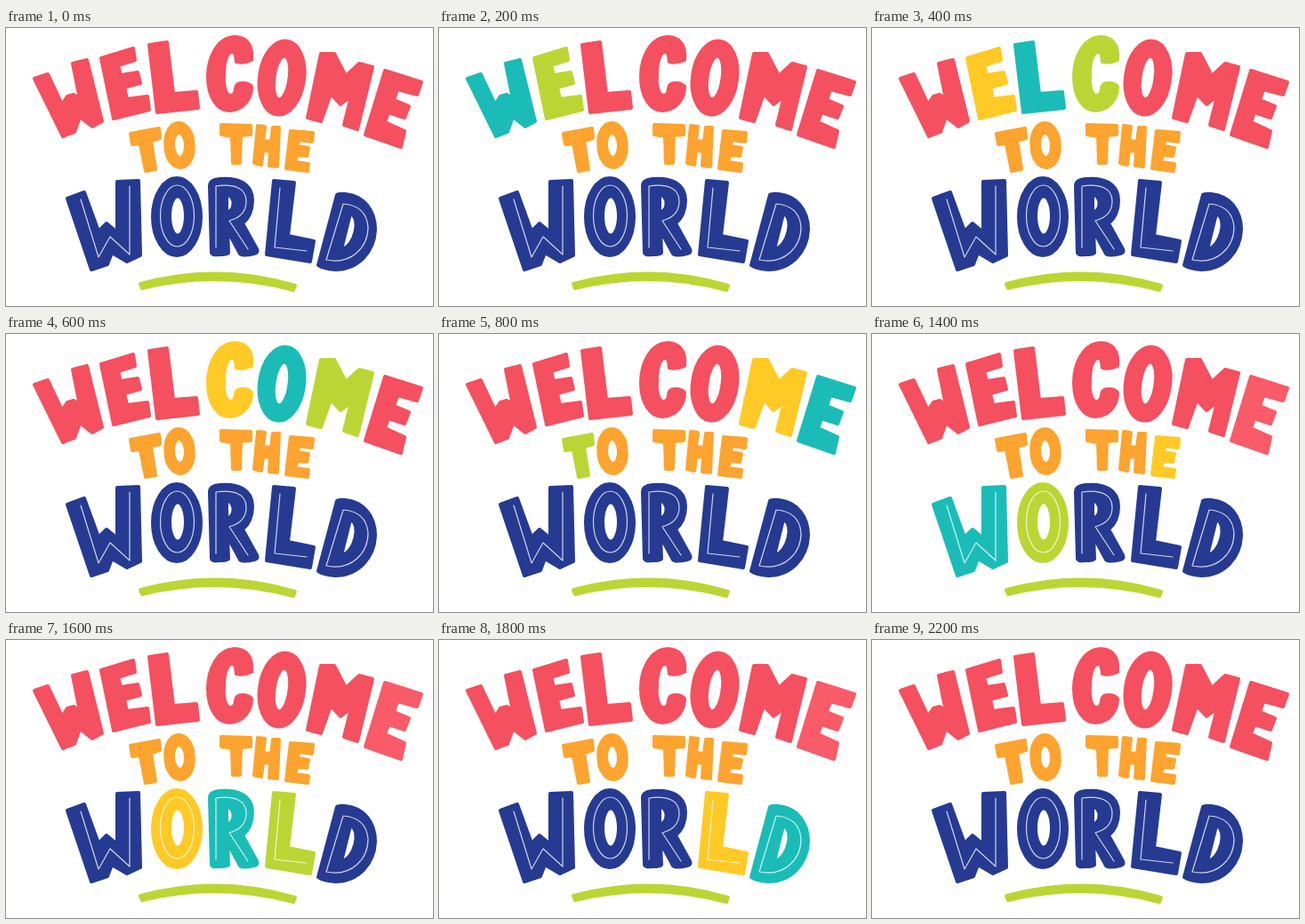
Animation, 480 px wide and 313 px high, one loop 2.4 s. Source, as an HTML page:

```html
<!DOCTYPE html>
<html lang="en">
<head>
<meta charset="utf-8">
<title>Welcome to the world</title>
<style>
  html, body { margin: 0; width: 100%; height: 100%; overflow: hidden; background: #fff; }
  svg { display: block; width: 100%; height: 100%; }
  .red { --base: #f45060; }
  .orange { --base: #fca42f; }
  .navy { --base: #263a92; }
  .tint { --after: #f95b68; }
  .letter, .swoosh {
    fill: currentColor;
    stroke: currentColor;
    stroke-width: 4;
    stroke-linejoin: round;
    fill-rule: evenodd;
  }
  .letter {
    color: var(--base);
    animation: glow 2400ms step-end infinite;
    animation-delay: calc(var(--i) * 100ms - 2300ms);
  }
  .swoosh { color: #bbd634; }
  .line { fill: none; stroke: #fff; stroke-opacity: .78; stroke-width: 1.2; stroke-linecap: round; }
  /* each letter runs through three colours, 100 ms apiece */
  @keyframes glow {
    0% { color: #bbd634; }
    4.16% { color: #1bbcb7; }
    8.33% { color: #ffca26; }
    12.49% { color: var(--after, var(--base)); }
    54.16%, 100% { color: var(--base); }
  }
</style>
</head>
<body>
<svg viewBox="0 0 480 313" role="img" aria-label="Welcome to the world">
  <g class="red">
    <path class="letter" style="--i:0" d="M32 57L47 52 63 86 69 77 76 75 83 80 75 40 91 36 108 105 97 111 83 100 77 117 64 122Z"/>
    <path class="letter" style="--i:1" d="M107 34L143 23 145 36 126 42 129 53 148 50 151 62 133 67 136 80 159 77 161 92 121 102Z"/>
    <path class="letter" style="--i:2" d="M161 19L181 16 188 74 214 72 216 90 170 95Z"/>
    <path class="letter" style="--i:3" d="M276 36C278 17 268 10 257 10C237 11 227 34 227 55C227 78 238 93 251 93C267 92 276 80 276 66Q273 62 266 62Q258 62 258 69C257 75 255 76 252 76C246 75 244 62 245 52C245 37 249 27 254 27C259 27 258 33 259 38Q267 40 276 36Z"/>
    <path class="letter" style="--i:4" d="M285.300 52.500a25 41 8 1 1 49.500 7a25 41 8 1 1-49.500-7zM301.600 54.800a8.500 23 8 1 0 16.800 2.400a8.500 23 8 1 0-16.800-2.400z"/>
    <path class="letter" style="--i:5" d="M339 101L354 29 369 29 382 54 397 40 412 44 395 114 380 109 388 77 376 86 365 74 354 105Z"/>
    <path class="letter tint" style="--i:6" d="M426 48L467 61 462 75 440 69 436 81 453 88 448 101 430 95 426 106 448 116 444 134 404 120Z"/>
  </g>
  <g class="orange">
    <path class="letter" style="--i:7" d="M140 119L172 113 173 124 163 127 168 159 157 161 151 130 142 131Z"/>
    <path class="letter" style="--i:8" d="M179.500 133a15.600 22.800-3 1 1 31-2a15.600 22.800-3 1 1-31 2zM188 132.500a7 14-3 1 0 14-1a7 14-3 1 0-14 1z"/>
    <path class="letter" style="--i:9" d="M242 109L275 110 275 120 264 121 263 152 255 152 254 122 242 120Z"/>
    <path class="letter" style="--i:10" d="M283 110L291 111 289 127 298 128 300 112 307 112 305 156 296 155 297 139 289 138 287 154 279 152Z"/>
    <path class="letter" style="--i:11" d="M320 116L345 118 344 128 329 126 328 133 340 135 338 144 327 143 325 151 340 153 339 161 315 158Z"/>
  </g>
  <g class="navy">
    <g class="letter" style="--i:12">
      <path d="M69 192L88 185 104 229 113 220 125 230 125 173 149 172 151 256 136 263 119 253 114 266 96 272Z"/>
      <path class="line" d="M84 193L104 258 117 235 139 255V178"/>
    </g>
    <g class="letter" style="--i:13">
      <path d="M165 212.500a27 43.500 0 1 1 54 0a27 43.500 0 1 1-54 0zM184 211.500a9 22 0 1 0 18 0a9 22 0 1 0-18 0z"/>
      <ellipse class="line" cx="192.500" cy="211.500" rx="19" ry="34.500"/>
    </g>
    <g class="letter" style="--i:14">
      <path d="M229 178Q229 171 240 170C261 168 277 175 277 194C277 207 272 215 266 220L282 249Q284 253 279 254Q266 257 263 254L249 228 250 253Q248 255 240 255Q232 256 231 253ZM248 187V208C258 205 258 190 248 187Z"/>
      <path class="line" d="M236 247V178C256 175 270 180 270 195Q270 212 251 217L272 249"/>
    </g>
    <g class="letter" style="--i:15">
      <path d="M301 172L324 174 317 234 346 240 342 263 293 255Z"/>
      <path class="line" d="M308 180L302 247 338 251"/>
    </g>
    <g class="letter" style="--i:16">
      <path d="M372 188Q374 186 382 187C402 189 415 205 415 227C414 252 396 272 370 272Q356 271 351 267ZM387 209L377 249C392 247 400 213 387 209Z"/>
      <path class="line" d="M379 198L360 261C389 267 407 246 407 224Q405 200 379 198"/>
    </g>
  </g>
  <path class="swoosh" d="M151 288Q238 264 325 290L323 295Q238 272 153 293Z"/>
</svg>
</body>
</html>
```
